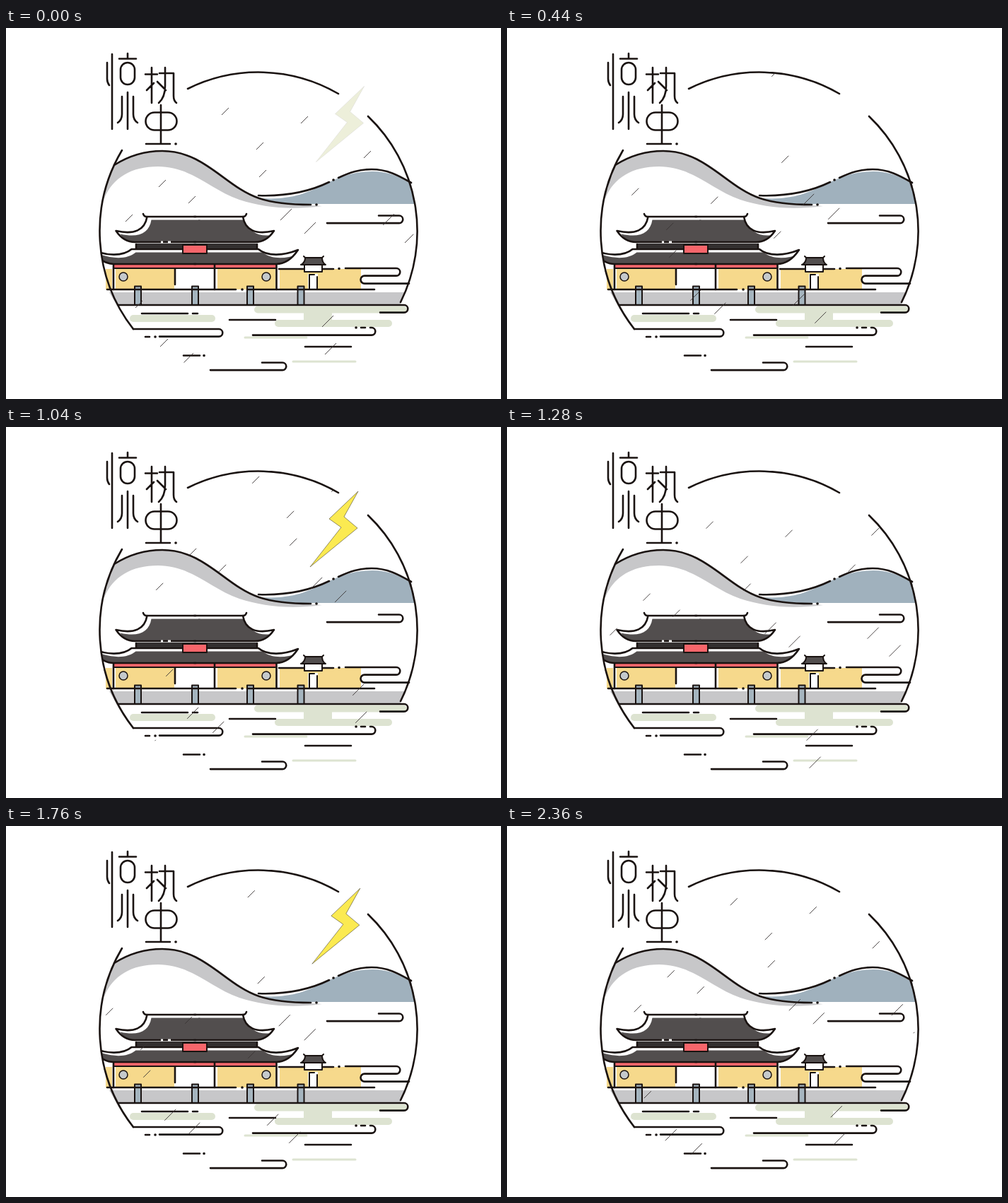
These frames come from a looping animation (700 by 525 pixels, 2400 ms). An HTML page:

```html
<!DOCTYPE html>
<html lang="zh">
<head>
<meta charset="utf-8">
<title>惊蛰</title>
<style>
html, body { margin: 0; width: 100%; height: 100%; overflow: hidden; background: #fff; }
svg { display: block; width: 700px; height: 525px; }
.ink { fill: none; stroke: #1a1311; stroke-width: 2.6; stroke-linecap: round; stroke-linejoin: round; }
.thin { stroke-width: 2; }
.dots { stroke-width: 3.6; }
.grey { fill: #c7c7c9; }
.blue { fill: #a0b1bd; }
.sand { fill: #f6d98c; }
.red { fill: #f7666b; }
.tile { fill: #524e4e; }
.white { fill: #fff; }
.moss { stroke: #dde3d1; stroke-linecap: round; }
</style>
</head>
<body>
<svg viewBox="0 0 700 525" role="img" aria-label="惊蛰">
  <defs>
    <clipPath id="sky"><circle cx="357.5" cy="282" r="219"/></clipPath>
    <clipPath id="disc"><circle cx="357.5" cy="288" r="225"/></clipPath>
    <path id="eave" d="M266 313H357C370 324 393 322 413 314C403 329 393 334 382 334H266"/>
    <path id="crown" d="M266 267H335C338 286 353 293 379 287C371 299 362 303 352 303H266"/>
  </defs>

  <g id="hills">
    <path class="blue" d="M362 241C440 246 452 204 518 203C542 203 558 211 573 221L578 249H425C402 249 380 247 362 241Z"/>
    <path class="grey" d="M153 194C175 180 197 174 221 174C281 174 310 225 358 241C380 248 405 250 447 252C400 258 365 254 330 243C290 229 262 196 215 196C177 196 151 212 139 241Q143 212 153 194Z"/>
    <path class="ink" d="M153 194C175 180 197 174 221 174C281 174 310 225 358 241Q385 250 431 250
      M357 237C385 238 420 236 457 218M470 212C487 204 500 200 517 200C541 200 557 210 573 219"/>
  </g>

  <g id="water"></g>
  <g id="wall"></g>
  <g id="roof" clip-path="url(#disc)"></g>
  <path class="ink" id="strokes"/>
  <path class="ink dots" id="dots"/>

  <path class="ink" d="M257 86A225 225 0 0 1 470 93M512 125A225 225 0 0 1 558 388M164 173A225 225 0 0 0 180 426"/>

  <path class="ink" id="title" d="M150 37V143M143 49V72q0 5 3 9
    M172 36v6M160 43.500H184M162 59a10 10 0 0 1 20 0V70a10 10 0 0 1 -20 0ZM172 91V143M164 97V122q0 8-6 12M180 97V122q0 8 6 12
    M206 56V106M197 65.500H214M199 88L209 78M217 64H237V96q0 7 4 10M225 56V82q0 16-9 24M214 76L226 88
    M210 119.500H229a12.500 12.500 0 0 1 0 25H210a12.500 12.500 0 0 1 0-25ZM219 109V164M198 164H232"/>

  <path id="bolt" stroke="#4b4633" stroke-width=".6" d="M498 91L457 130L474 142L430 198L497 143L478 127Z"/>
  <g id="rain" clip-path="url(#sky)" stroke="#3a3535"></g>
</svg>
<script>
const $ = id => document.getElementById(id);
const LOOP = 2400, STEP = 40, FALL = 1200, STRIKE = 800;

function add(parent, tag, attrs) {
  const el = document.createElementNS(parent.namespaceURI, tag);
  for (const k in attrs) el.setAttribute(k, attrs[k]);
  return parent.appendChild(el);
}
const path = (parent, cls, d, more) => add(parent, 'path', { class: cls, d, ...more });
const box = (parent, cls, x, y, x2, y2) =>
  add(parent, 'rect', { class: cls, x, y, width: x2 - x, height: y2 - y });

// flat strokes: a dash, and a line that bends round and runs back
const dash = (x, x2, y) => `M${x} ${y}H${x2}`;
const hook = (x, bend, y, back) => `M${x} ${y}H${bend}a5.3 5.3 0 0 1 0 10.600H${back}`;
const dot = (x, y) => `M${x} ${y}h.1`;

function drawWater(g) {
  const pill = (x, x2, y, w) => path(g, 'moss', dash(x, x2, y), { 'stroke-width': w });
  pill(180, 291, 411, 10);
  pill(356, 562, 398.5, 10);
  pill(385, 541, 418, 10);
  pill(338, 425, 438, 3);
  pill(406, 494, 472, 3);
  path(g, 'moss', 'M441 403V414', { 'stroke-width': 40, style: 'stroke-linecap:butt' });
}

function drawWall(g) {
  for (const [x, x2] of [[141, 150], [155, 238], [299, 381], [387, 502]])
    box(g, 'sand', x, 341, x2, 370);
  box(g, 'red', 153, 334, 382, 340);
  path(g, 'grey', 'M146 374H564L558 391H156Z');
  path(g, 'ink thin', 'M153 340H381');
  path(g, 'ink', 'M152 335V370M382.500 335V370M239 341V363M295 335V370');
  for (const cx of [166, 368])
    add(g, 'circle', { cx, cy: 352, r: 6, class: 'ink', style: 'fill:#c4c9cc;stroke-width:1.5' });

  box(g, 'white', 427, 348, 441, 369);
  box(g, 'white', 422, 335, 447, 345);
  path(g, 'ink thin', 'M422 336V345H447V336M429 369V349H436M440 352V369');
  path(g, 'ink thin', 'M423 325H447Q447 332 452 335H417Q423 332 423 325ZM421 323l2 2M449 323l-2 2', { style: 'fill:#524e4e' });
  for (const x of [182, 263, 341, 412.5])
    box(g, 'ink thin', x, 365.5, x + 9, 392).style.fill = '#a5b5bf';
}

// each roof is one half and its mirror; the tiles are the same shape, nudged and cut
function drawRoof(g, id) {
  const halves = parent => ['', 'translate(534.5 0) scale(-1 1)'].forEach(transform =>
    add(parent, 'use', { href: '#' + id, transform }));
  halves(add(g, 'clipPath', { id: id + 'Cut' }));
  const cut = add(g, 'g', { 'clip-path': `url(#${id}Cut)` });
  halves(add(cut, 'g', { class: 'tile', transform: 'translate(6 4.5)' }));
  halves(add(g, 'g', { class: 'ink' }));
}

drawWater($('water'));
drawWall($('wall'));

const roof = $('roof');
drawRoof(roof, 'eave');
box(roof, '', 184, 305, 355, 312).setAttribute('fill', '#332f2f');
path(roof, 'ink', 'M184 306V312M355 306V312');
drawRoof(roof, 'crown');
path(roof, 'ink', 'M194 263q1 4 5 4M340 263q-1 4-5 4');
path(roof, '', dash(219, 222, 303) + dash(229, 233, 303), { stroke: '#fff', 'stroke-width': 3 });
box(roof, 'ink thin', 250, 307, 284, 319).style.fill = '#f7666b';

$('strokes').setAttribute('d', [
  hook(180, 301, 426, 217), dash(197, 203, 437),
  hook(515, 517, 424, 349), dash(502, 508, 424),
  hook(362, 391, 473.5, 289), hook(158, 563, 392, 529),
  hook(527, 556, 265.5, 454), hook(480, 552, 340, 507), 'a5.500 5.500 0 0 0 0 11H570',
  dash(192, 257, 404), dash(264, 271, 404), dash(316, 381, 413),
  dash(423, 488, 451), dash(251, 274, 463.5),
  dash(143, 325, 370), dash(341, 521, 370), dash(386, 421, 341), dash(448, 463, 341)
].join(''));
$('dots').setAttribute('d', [
  dot(211, 437), dot(495, 424), dot(280, 463.5), dot(334, 370),
  dot(471, 340.5), dot(439, 250), dot(463, 215), dot(240, 164)
].join(''));

// where the drops are halfway down
const drops = [
  [310, 118], [422, 130], [359, 167], [363, 206], [511, 179], [221, 220],
  [263, 243], [174, 269], [396, 264], [430, 283], [541, 271], [572, 296],
  [188, 391], [455, 415], [221, 448], [459, 454], [257, 468]
];

// two sheets of rain, one a full fall behind the other
const sheets = [0, 1].map(() => {
  const g = add($('rain'), 'g', { 'stroke-width': 0.9 });
  for (const [x, y] of drops) {
    const r = y > 250 && x > 200 ? 8 : 5;
    path(g, '', `M${x - r} ${y + r}L${x + r} ${y - r}`);
  }
  return g;
});

const move = (el, x, y) => el.setAttribute('transform', `translate(${x} ${y})`);

function draw(t) {
  const f = t % FALL, s = t % STRIKE;
  move(sheets[0], -0.2925 * f, 0.2585 * f);
  move(sheets[1], 0.27 * (FALL - f), -0.27 * (FALL - f));

  // the bolt swells from a pale ghost to full yellow and back while it slides
  const bolt = $('bolt'), d = (240 - s) * 0.0355;
  const wave = Math.sin(Math.PI * Math.min(1, (s + 40) / 440));
  const k = Math.min(1, 1.15 * Math.max(0, wave) ** 1.4);
  move(bolt, d, -d);
  bolt.setAttribute('opacity', k.toFixed(3));
  bolt.setAttribute('fill', `hsl(${70 - 16 * k}, ${30 + 65 * k}%, ${45 + 20 * k}%)`);
}

const start = performance.now();
function tick() {
  const t = (performance.now() - start) % LOOP;
  draw(Math.floor(t / STEP) * STEP);
  requestAnimationFrame(tick);
}
tick();
</script>
</body>
</html>
```
